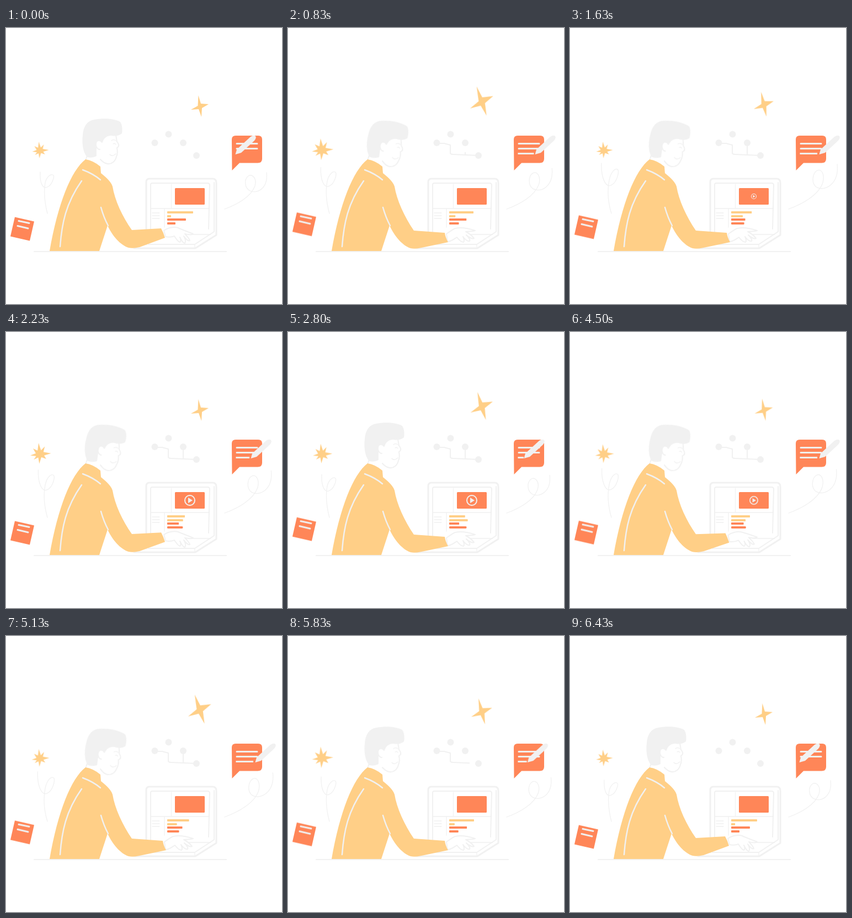
These frames come from a looping animation (500x500 px, 6.51 s). An HTML page without scripts:

```html
<!DOCTYPE html>
<html lang="en">
<head>
<meta charset="utf-8">
<title>Working at a laptop</title>
<style>
  :root {
    --gray: #f1f1f1;
    --orange: #ff8658;
    --yellow: #ffcf87;
    --loop: 6.51s;
    --half: 3.255s;
    --third: 2.17s;
    --quarter: 1.6275s;
    --sine: cubic-bezier(.37, 0, .63, 1);
  }
  html, body { margin: 0; width: 100%; height: 100%; overflow: hidden; background: #fff; }
  svg { display: block; width: 100%; height: 100%; }

  .line { fill: none; stroke: var(--gray); stroke-width: 2; stroke-linecap: round; stroke-linejoin: round; }
  .paper { fill: #fff; }
  .gray { fill: var(--gray); }
  .orange { fill: var(--orange); }
  .yellow { fill: var(--yellow); }
  .thick { stroke-width: 3; }
  .thin { stroke-width: 1.3; }

  .head { transform-origin: 150px 240px; animation: nod var(--half) infinite; }
  @keyframes nod {
    0%, 16.7% { transform: none; animation-timing-function: var(--sine); }
    25%, 68% { transform: rotate(8deg); animation-timing-function: var(--sine); }
    82%, 100% { transform: none; }
  }

  .spark { animation: spark var(--third) var(--sine) infinite; }
  @keyframes spark {
    0%, 100% { transform: translate(351px, 142px); }
    41% { transform: translate(350.5px, 133px) rotate(-11deg) scale(1.42); }
  }

  .note { animation: float var(--third) var(--sine) infinite; }
  @keyframes float {
    0%, 100% { transform: none; }
    41% { transform: translateY(-8.5px); }
  }

  .burst { animation: pulse var(--quarter) var(--sine) infinite; }
  @keyframes pulse {
    0%, 100% { transform: translate(61.5px, 222px); }
    50% { transform: translate(61.5px, 221px) scale(1.3); }
  }

  .pen { animation: write var(--half) linear infinite; }
  @keyframes write {
    0% { transform: none; }
    16.7% { transform: translateX(23px); }
    25.5% { transform: translateX(32px); }
    35%, 60% { transform: translateX(36px); }
    86% { transform: translateX(12px); }
    97%, 100% { transform: none; }
  }
  .ink { stroke-dasharray: 36 60; stroke-linecap: butt; animation: ink var(--half) linear infinite; }
  @keyframes ink {
    0% { stroke-dashoffset: 36; }
    16.7% { stroke-dashoffset: 12; }
    25.5% { stroke-dashoffset: 3; }
    35%, 60% { stroke-dashoffset: 0; }
    86% { stroke-dashoffset: 24; }
    97%, 100% { stroke-dashoffset: 36; }
  }

  .bar { transform-box: fill-box; transform-origin: 0 50%; animation: bar var(--loop) var(--sine) infinite; }
  @keyframes bar { 50% { transform: scaleX(var(--to)); } }

  .play { transform-origin: 333px 305px; animation: pop var(--loop) infinite; }
  @keyframes pop {
    0%, 23% { transform: scale(0); animation-timing-function: var(--sine); }
    30%, 68% { transform: none; animation-timing-function: var(--sine); }
    75%, 100% { transform: scale(0); }
  }

  .wire { stroke-dasharray: 1 2; stroke-linecap: butt; animation: wire var(--loop) linear infinite; }
  .branch { animation-name: branch; }
  @keyframes wire {
    0%, 2% { stroke-dashoffset: 1; }
    12.5%, 88% { stroke-dashoffset: 0; }
    97%, 100% { stroke-dashoffset: 1; }
  }
  @keyframes branch {
    0%, 12% { stroke-dashoffset: 1; }
    16%, 85% { stroke-dashoffset: 0; }
    89%, 100% { stroke-dashoffset: 1; }
  }
</style>
</head>
<body>
<svg viewBox="0 0 500 500">
  <!-- stars -->
  <path class="yellow spark" d="M-2.5-20 2-5 16-4 4 3 3 19-2 5-16 6-3.5-1Z"/>
  <path class="yellow burst" d="M-2-16 1.5-5.5 7-11 5-3 16-1 6 2 9 7 2 4.5-1 14-2.5 5-9 8-5.5 3-14 2-6-1-10-8-3.5-5Z"/>

  <!-- curls -->
  <path class="line thin" d="M62 261C61 282 67 292 75 288C83 285 88 270 86 267C83 263 74 268 71 280C68 298 70 316 75 336">
    <animate attributeName="d" dur="3.255s" repeatCount="indefinite" calcMode="spline" keyTimes="0;.5;1" keySplines=".37 0 .63 1;.37 0 .63 1"
      values="M62 261C61 282 67 292 75 288C83 285 88 270 86 267C83 263 74 268 71 280C68 298 70 316 75 336;M57 245C56 270 64 289 74 285C84 281 89 264 87 257C83 252 74 260 71 276C67 296 69 316 75 336;M62 261C61 282 67 292 75 288C83 285 88 270 86 267C83 263 74 268 71 280C68 298 70 316 75 336"/>
  </path>
  <path class="line thin" d="M396 328C418 320 444 306 451 286C455 272 446 264 439 268C431 274 432 290 442 295C456 301 475 290 472 262">
    <animate attributeName="d" dur="3.255s" repeatCount="indefinite" calcMode="spline" keyTimes="0;.5;1" keySplines=".37 0 .63 1;.37 0 .63 1"
      values="M396 328C418 320 444 306 451 286C455 272 446 264 439 268C431 274 432 290 442 295C456 301 475 290 472 262;M396 328C418 320 450 304 458 280C462 264 455 255 448 258C440 262 436 280 446 288C460 297 488 284 484 247;M396 328C418 320 444 306 451 286C455 272 446 264 439 268C431 274 432 290 442 295C456 301 475 290 472 262"/>
  </path>

  <!-- note -->
  <g class="note">
    <path class="orange" d="M16 342.5 51 350.5 43 385.5 8 377.5Z"/>
    <path class="line thick" d="M23 349.5 42 353.5M21 358.5 40 363" stroke-width="2.5"/>
  </g>

  <!-- bubble and pen -->
  <path class="orange" d="M409 202Q409 195 416 195H457Q464 195 464 202V237Q464 244.500 456 244.500H423L409.500 258Z"/>
  <path class="line thick" d="M418 209.500H455M418 218.500H455"/>
  <path class="line thick ink" pathLength="36" d="M416.500 227.500H448"/>
  <path class="gray pen" d="M415.500 229 418 220 443 197Q449 193 452 196Q454 199 450 204L426 226Z"/>

  <!-- network -->
  <path class="line wire" pathLength="1" d="M270 209H283L294 212V227Q295 229 300 229L345 231"/>
  <path class="line wire branch" pathLength="1" d="M321 229V208"/>
  <g class="gray">
    <circle cx="269.500" cy="208" r="6"/>
    <circle cx="294.500" cy="192.500" r="6"/>
    <circle cx="321" cy="208" r="6"/>
    <circle cx="345" cy="231" r="6"/>
  </g>

  <!-- laptop -->
  <g class="line">
    <path class="thick" d="M254 392V279Q254 273 260 273H374Q381 273 381 280V375L343 399H232"/>
    <path d="M262 369V284Q262 281 265 281H365Q369 281 369 285L367 364"/>
    <path d="M377 280V369L342 392H258"/>
    <path class="thin" d="M342 392V398M331 374H371M299.500 283V326M262 327H368M287 328V361"/>
    <path class="thin" d="M265 335H278M265 340H278M265 345H278"/>
    <path d="M51 405H399"/>
  </g>
  <rect class="orange" x="306" y="290" width="54" height="30" rx="1.5"/>
  <g class="play">
    <circle class="line" cx="333" cy="305" r="9"/>
    <path class="gray" d="M330 300 338 305 330 310Z"/>
  </g>
  <rect class="yellow bar" style="--to:.596" x="292" y="332" width="47" height="4" rx="1"/>
  <rect class="yellow bar" style="--to:5" x="292" y="339" width="7" height="4" rx=".5"/>
  <rect class="orange bar" style="--to:.515" x="292" y="345" width="34" height="4" rx="1"/>
  <rect class="orange bar" style="--to:2.15" x="292" y="352" width="15" height="4" rx="1"/>

  <!-- head -->
  <path class="line" d="M147 231 144 240"/>
  <g class="head">
    <path class="paper" d="M160 190H199L201 206 206 214 201 218Q203 228 199 234Q195 247 183 246L172 242H150Z"/>
    <path class="line" d="M199 194 201 206M202 207Q207 214 201 217Q203 227 200 233C198 242 191 247 184 246Q177 245 171 238"/>
    <path class="gray" d="M147 234C140 226 137 211 139 194C140 178 147 168 160 166C176 163 196 164 207 170C211 176 211 185 210 191Q202 197 191 195C181 195 177 201 175 207L164 208 164 232Q157 236 147 234Z"/>
    <path class="line paper" style="fill:#fff" d="M174 207Q168 201 164 206C161 213 165 220 170 220"/>
    <path class="line thin" d="M191 204Q195 201 199 204M194 210Q197 208 199 211M188 229Q192 234 199 228"/>
  </g>

  <!-- hand -->
  <path class="line" style="fill:#fff" d="M286 367C294 361 306 360 312 362C320 366 332 370 339 373C336 376 330 374 324 373C328 377 332 382 333 385C330 387 326 382 322 377C325 382 326 387 324 390C320 390 318 384 315 379C317 383 317 387 315 388C311 387 308 381 305 377C300 379 294 379 289 378Z">
    <animate attributeName="d" dur="2.17s" repeatCount="indefinite" calcMode="spline" keyTimes="0;.25;.78;.96;1" keySplines=".37 0 .63 1;0 0 1 1;.37 0 .63 1;0 0 1 1"
      values="M286 367C294 361 306 360 312 362C320 366 332 370 339 373C336 376 330 374 324 373C328 377 332 382 333 385C330 387 326 382 322 377C325 382 326 387 324 390C320 390 318 384 315 379C317 383 317 387 315 388C311 387 308 381 305 377C300 379 294 379 289 378Z;M287 373C294 368 300 364 303 363C316 360 330 364 339 367C334 369 326 368 322 369C328 372 334 377 337 381C333 383 328 379 323 375C328 380 330 384 329 386C325 387 320 382 317 378C319 382 320 386 318 388C313 388 309 383 306 379C301 382 296 387 289 387Z;M287 373C294 368 300 364 303 363C316 360 330 364 339 367C334 369 326 368 322 369C328 372 334 377 337 381C333 383 328 379 323 375C328 380 330 384 329 386C325 387 320 382 317 378C319 382 320 386 318 388C313 388 309 383 306 379C301 382 296 387 289 387Z;M286 367C294 361 306 360 312 362C320 366 332 370 339 373C336 376 330 374 324 373C328 377 332 382 333 385C330 387 326 382 322 377C325 382 326 387 324 390C320 390 318 384 315 379C317 383 317 387 315 388C311 387 308 381 305 377C300 379 294 379 289 378Z;M286 367C294 361 306 360 312 362C320 366 332 370 339 373C336 376 330 374 324 373C328 377 332 382 333 385C330 387 326 382 322 377C325 382 326 387 324 390C320 390 318 384 315 379C317 383 317 387 315 388C311 387 308 381 305 377C300 379 294 379 289 378Z"/>
  </path>

  <!-- sweater -->
  <path class="yellow" d="M144 238C118 258 94 318 79 404H169L184 358C193 377 207 393 222 398Q230 400 242 397L288 380Q285 370 281 363L228 366C211 342 197 312 193 287Q190 277 172 263L171 251Q158 240 144 238Z">
    <animate attributeName="d" dur="2.17s" repeatCount="indefinite" calcMode="spline" keyTimes="0;.25;.78;.96;1" keySplines=".37 0 .63 1;0 0 1 1;.37 0 .63 1;0 0 1 1"
      values="M144 238C118 258 94 318 79 404H169L184 358C193 377 207 393 222 398Q230 400 242 397L288 380Q285 370 281 363L228 366C211 342 197 312 193 287Q190 277 172 263L171 251Q158 240 144 238Z;M144 238C118 258 94 318 79 404H169L184 358C193 377 207 394 222 399Q230 401 242 398L290 388Q285 379 284 371L228 367C211 342 197 312 193 287Q190 277 172 263L171 251Q158 240 144 238Z;M144 238C118 258 94 318 79 404H169L184 358C193 377 207 394 222 399Q230 401 242 398L290 388Q285 379 284 371L228 367C211 342 197 312 193 287Q190 277 172 263L171 251Q158 240 144 238Z;M144 238C118 258 94 318 79 404H169L184 358C193 377 207 393 222 398Q230 400 242 397L288 380Q285 370 281 363L228 366C211 342 197 312 193 287Q190 277 172 263L171 251Q158 240 144 238Z;M144 238C118 258 94 318 79 404H169L184 358C193 377 207 393 222 398Q230 400 242 397L288 380Q285 370 281 363L228 366C211 342 197 312 193 287Q190 277 172 263L171 251Q158 240 144 238Z"/>
  </path>
  <path class="line" d="M139 257Q158 264 171 275M137 277C108 318 101 355 98 396M172 325Q177 343 185 358" style="stroke-width:2.5"/>
</svg>
</body>
</html>
```
